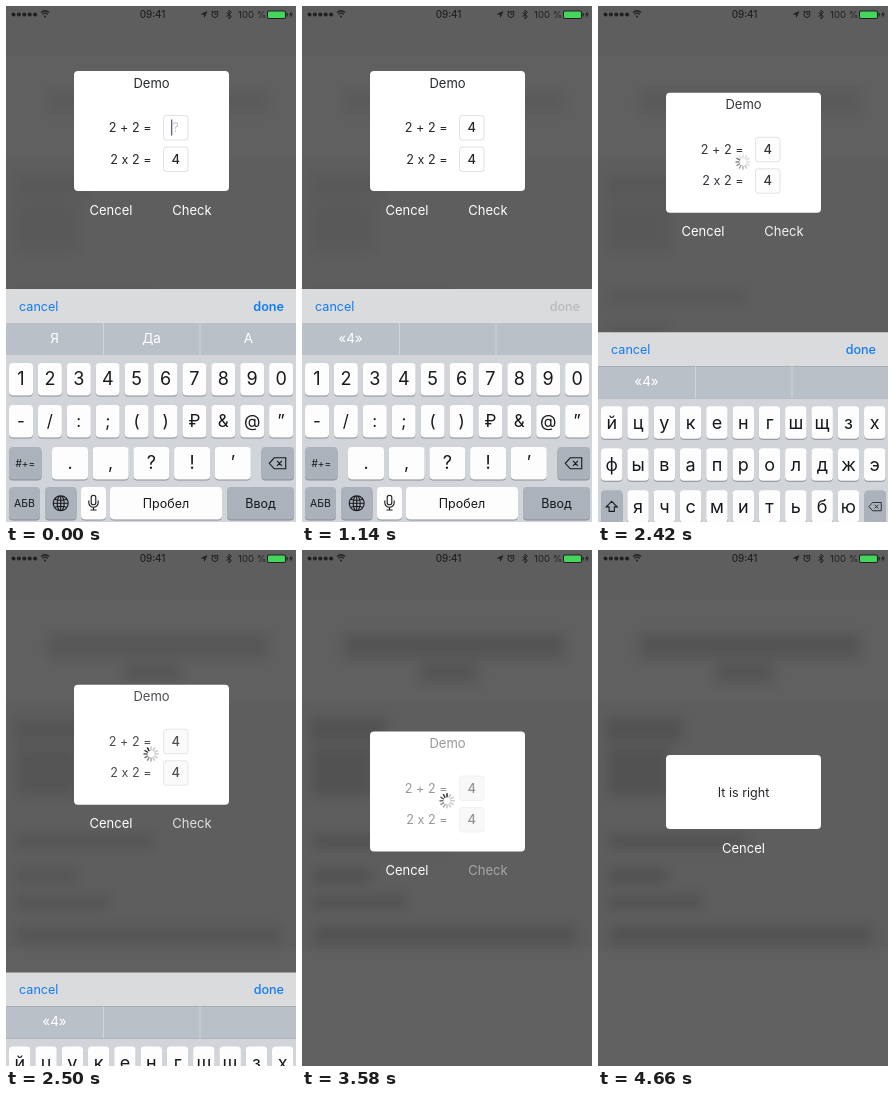
Write an HTML page with a canvas that moves like this. It is 290 px wide and 516 px high and loops after 4900 ms.

```html
<!DOCTYPE html>
<html lang="en">
<head>
<meta charset="utf-8">
<title>Quiz dialog</title>
<style>
html, body { margin: 0; overflow: hidden; background: #606060; }
canvas { display: block; }
</style>
</head>
<body>
<canvas id="stage" width="290" height="516"></canvas>
<script>
const W = 290, H = 516, LOOP = 4900;
const TYPE = 620, LETTERS = 1300, CHECK = 2370, RESULT = 3880;
const INK = '#24272c', BLUE = '#137cf0', FONT = 'Inter, "Open Sans", sans-serif';
const c = document.getElementById('stage').getContext('2d');

const clamp = x => Math.min(1, Math.max(0, x));
const mix = (a, b, p) => a + (b - a) * p;
const ramp = (t, from, to) => clamp((t - from) / (to - from));
// Critically damped spring, time in ms
const spring = t => t <= 0 ? 0 : 1 - (1 + t * .0154) * Math.exp(-t * .0154);

function box(x, y, w, h, r, fill) {
  c.fillStyle = fill;
  c.beginPath();
  c.roundRect(x, y, w, h, r);
  c.fill();
}

function text(str, x, y, size, color, align = 'center', weight = 400) {
  c.font = `${weight} ${size}px ${FONT}`;
  c.textAlign = align;
  c.textBaseline = 'alphabetic';
  c.fillStyle = color;
  c.fillText(str, x, y + size * .36);
}

function icon(path, x, y, { fill, stroke, width = 1 }) {
  c.save();
  c.translate(x, y);
  const p = new Path2D(path);
  if (fill) { c.fillStyle = fill; c.fill(p); }
  if (stroke) { c.strokeStyle = stroke; c.lineWidth = width; c.stroke(p); }
  c.restore();
}

function fade(alpha, draw) {
  c.save();
  c.globalAlpha *= alpha;
  draw();
  c.restore();
}

// Blurred page behind the dimmed overlay: x, y, width, height
const blurred = document.createElement('canvas');
blurred.width = W;
blurred.height = H;
const b = blurred.getContext('2d');
b.filter = 'blur(6px)';
b.fillStyle = 'rgba(0,0,0,.12)';
[[42, 84, 220, 24], [118, 112, 58, 20], [8, 168, 76, 24], [10, 196, 62, 50],
 [10, 284, 138, 14], [10, 318, 60, 16], [10, 345, 94, 14], [12, 376, 262, 18]]
  .forEach(r => b.fillRect(...r));

function backdrop(settled) {
  c.fillStyle = '#606060';
  c.fillRect(0, 0, W, H);
  c.fillStyle = 'rgba(0,0,0,.025)';
  c.fillRect(0, 0, W, 49);
  c.fillRect(0, 150, W, 250);
  fade(mix(.4, 1, settled), () => c.drawImage(blurred, 0, 0));
}

function statusBar() {
  const dark = '#202020';
  for (let i = 0; i < 5; i++) box(5.5 + i * 5.4, 6.5, 4, 4, 2, dark);
  icon('M-4-1.5Q0-5 4-1.5M-2.6 .3Q0-2 2.6 .3', 39, 8, { stroke: dark, width: 1.3 });
  box(38, 9.5, 2, 2, 1, dark);
  text('09:41', 146.5, 8.5, 9.8, dark, 'center', 500);
  icon('M3.5-3.5L.3 3.5-.3 .3-3.5-.3Z', 198, 8.5, { fill: dark });
  icon('M-3 0a3 3 0 1 0 6 0a3 3 0 1 0-6 0M0-2V0H1.8M-3.6-2.4L-1.8-3.8M3.6-2.4L1.8-3.8', 209, 8.5, { stroke: dark });
  icon('M-2.5-2L2.5 2 0 4.5V-4.5L2.5-2-2.5 2', 223, 8.5, { stroke: dark });
  text('100 %', 232, 8.5, 9.6, dark, 'left');
  box(261, 4.5, 19, 8.5, 2, dark);
  box(262, 5.5, 17, 6.5, 1, '#43d65b');
  box(280.5, 7, 1.2, 3.5, .5, dark);
  icon('M1-4L-2 .7H0L-1 4 2-.7H0Z', 285, 8.5, { fill: dark });
}

function key(x, y, w, label, size = 18, fill = '#fdfdfe') {
  box(x, y + 1, w, 32.5, 4, '#898d93');
  box(x, y, w, 32.5, 4, fill);
  text(label, x + w / 2, y + 16, size, '#16181b');
}

function keyRow(chars, x, y, w, pitch, size) {
  [...chars].forEach((ch, i) => key(x + i * pitch, y, w, ch, size));
}

function keyboard(t) {
  const letters = t >= LETTERS, grey = '#abb2bc', line = { stroke: '#16181b', width: 1.1 };

  box(0, 283, W, 34, 0, '#dadbdd');
  text('cancel', 13, 300, 12.6, BLUE, 'left');
  const pressed = ramp(t, 1040, 1120) * (1 - ramp(t, 1220, 1480));
  fade(1 - pressed, () => text('done', 278, 300, 12.6, BLUE, 'right', letters ? 500 : 600));
  fade(pressed, () => text('done', 278, 300, 12.6, '#b7babf', 'right', 500));

  box(0, 317, W, 32, 0, '#b9c0c8');
  box(97, 317, 1, 32, 0, '#d0d5da');
  box(193.5, 317, 1, 32, 0, '#d0d5da');
  const hints = t < TYPE ? ['Я', 'Да', 'А'] : ['«4»'];
  hints.forEach((word, i) => text(word, 48.5 + i * 97, 332, 13.5, '#fff'));

  box(0, 349, W, 240, 0, '#d1d5da');
  if (letters) {
    keyRow('йцукенгшщзх', 3, 357, 21.5, 26.3, 18);
    keyRow('фывапролджэ', 3, 399, 21.5, 26.3, 18);
    key(3, 441, 21.5, '', 10, grey);
    icon('M0-5.5L5.5 0H2.6V4.5H-2.6V0H-5.5Z', 13.7, 457.5, line);
    keyRow('ячсмитьбю', 29.3, 441, 21.5, 26.3, 18);
  } else {
    keyRow('1234567890', 3, 357, 24, 28.9, 18);
    keyRow('-/:;()₽&@”', 3, 399, 24, 28.9, 17);
    key(3, 441, 32.5, '#+=', 10, grey);
    keyRow('.,?!’', 46, 441, 36, 40.7, 18);
  }
  const backX = letters ? 266.5 : 255.5, small = letters ? .75 : 1;
  key(backX, 441, 288 - backX, '', 10, grey);
  c.save();
  c.translate((backX + 288) / 2, 457.3);
  c.scale(small, small);
  icon('M-8.5 0L-3.5-5.5H8V5.5H-3.5ZM-.8-2.5L4.2 2.5M4.2-2.5L-.8 2.5', 0, 0, line);
  c.restore();

  key(3, 481, 31, letters ? '123' : 'АБВ', letters ? 12 : 10.5, grey);
  key(39, 481, 31.5, '', 10, grey);
  icon('M-7.5 0a7.5 7.5 0 1 0 15 0a7.5 7.5 0 1 0-15 0M-3.5 0a3.5 7.5 0 1 0 7 0a3.5 7.5 0 1 0-7 0M0-7.5V7.5M-7.5 0H7.5M-6-4Q0-2 6-4M-6 4Q0 2 6 4', 54.7, 497.3, line);
  key(75, 481, 25, '');
  icon('M-2.3-5a2.3 2.3 0 0 1 4.6 0V0a2.3 2.3 0 0 1-4.6 0ZM-4.7-2V0a4.7 4.7 0 0 0 9.4 0V-2M0 4.7V7.5M-3 7.5H3', 87.5, 496.5, line);
  key(104, 481, 112, 'Пробел', 12.5);
  key(221, 481, 67, 'Ввод', 12.5, grey);
}

function spinner(t, x, y) {
  const head = Math.floor((t - 2740) / (1000 / 12) + .5) + 2;
  c.save();
  c.translate(x, y);
  c.lineWidth = 1.5;
  c.lineCap = 'round';
  for (let i = 0; i < 12; i++) {
    const age = (((head - i) % 12) + 12) % 12;
    c.strokeStyle = `rgba(35,38,42,${Math.max(.25, 1 - age * .12)})`;
    c.beginPath();
    c.moveTo(0, -4);
    c.lineTo(0, -7);
    c.stroke();
    c.rotate(Math.PI / 6);
  }
  c.restore();
}

function question(label, y, answer, t) {
  text(label, 145.5, y, 12.6, INK, 'right');
  box(157, y - 12.5, 25.5, 25.5, 4, '#dfe1e4');
  box(158, y - 11.5, 23.5, 23.5, 3, '#fff');
  if (answer) {
    text(answer, 169.7, y, 13, INK, 'center', 500);
  } else {
    text('?', 169.5, y, 13, '#c3c8d0');
    fade(1 - ramp(t, 450, 560), () => box(165, y - 8, 1.3, 16, 0, '#5c6470'));
  }
}

function dialog(t, settled) {
  const morph = spring(t - RESULT);
  const top = mix(65 + 116.5 * settled, 205, morph);
  const height = mix(120, 74, morph);
  const busy = ramp(t, CHECK, 2740);

  box(68, top, 155, height, 4, '#fff');
  c.save();
  c.beginPath();
  c.rect(68, top, 155, height);
  c.clip();
  fade(1 - ramp(morph, 0, .6), () => {
    c.translate(0, top - 65);
    fade(mix(1, .48, busy), () => {
      text('Demo', 145.5, 77, 13, INK);
      question('2 + 2 =', 121.5, t >= TYPE ? '4' : '', t);
      question('2 x 2 =', 153, '4', t);
    });
    fade(ramp(t, CHECK, CHECK + 80), () => spinner(t, 145, 134.3));
  });
  fade(ramp(morph, .4, 1), () => text('It is right', 145.5, top + height / 2, 12.6, INK));
  c.restore();

  const buttonY = top + height + 19;
  text('Cencel', mix(105, 145.5, morph), buttonY, 13, '#fff');
  fade(mix(1, .45, busy) * (1 - ramp(morph, 0, .6)), () => text('Check', 186, buttonY, 13, '#fff'));
}

function render(t) {
  const settled = spring(t - CHECK);
  backdrop(settled);
  statusBar();
  dialog(t, settled);
  if (settled < .999) {
    c.save();
    c.translate(0, 233 * settled);
    keyboard(t);
    c.restore();
  }
}

const start = performance.now();
function tick() {
  render((performance.now() - start) % LOOP);
  requestAnimationFrame(tick);
}
tick();
</script>
</body>
</html>
```
